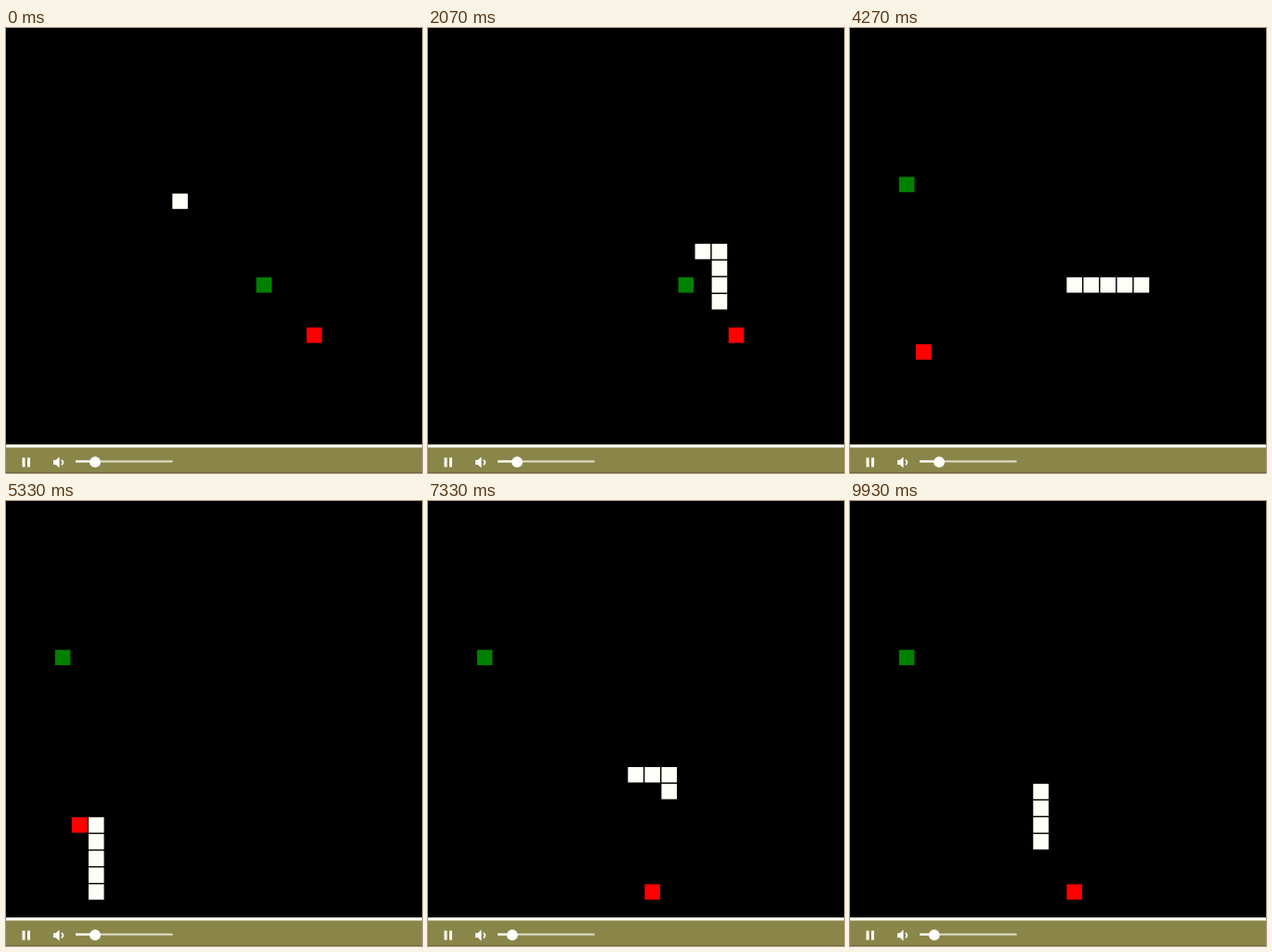
Recreate the animation shown at these times as an HTML page with a canvas. Size 448 by 480 pixels, loop 9.99 s.

```html
<!DOCTYPE html>
<html lang="en">
<head>
<meta charset="utf-8">
<title>Snake volume control</title>
<style>
  html, body { margin: 0; width: 100%; height: 100%; overflow: hidden; background: #000; }
  canvas { display: block; }
</style>
</head>
<body>
<canvas id="stage" width="448" height="480"></canvas>
<script>
const ctx = document.getElementById('stage').getContext('2d');
const LOOP = 9990;
const GRID = 25;
const PITCH = 18.06;
const CELL = 16.6;

const DIRS = { U: [0, -1], D: [0, 1], L: [-1, 0], R: [1, 0] };
const ROUTE = 'D9 L2 U6 R9 D8 L6 U3 R9 U3 L15 D9 R4 U5 L6 U3 R11 D10 L7 D4 R4 D15';

// Walk the route once; the board wraps at its edges.
const path = [[10, 10]];
for (const leg of ROUTE.split(' ')) {
  const [dx, dy] = DIRS[leg[0]];
  for (let n = +leg.slice(1); n > 0; n--) {
    const [x, y] = path[path.length - 1];
    path.push([(x + dx + GRID) % GRID, (y + dy + GRID) % GRID]);
  }
}

// Red shortens the snake and lowers the volume, green does the opposite.
const stages = [
  { from: 0, red: [18, 18], green: [15, 15], size: 5 },
  { from: 50, red: [4, 19], green: [15, 15], size: 4 },
  { from: 60, red: [4, 19], green: [3, 9], size: 5 },
  { from: 93, red: [13, 23], green: [3, 9], size: 4 }
];
const stageAt = step => stages.filter(s => s.from <= step).pop();

// Ticks come at 0, 70 and 130 ms of every 200 ms.
function tickAt(t) {
  const rest = t % 200;
  return 3 * Math.floor(t / 200) + (rest >= 70) + (rest >= 130);
}

// The game waits two ticks, and later makes two moves within one tick.
const stepAt = tick => Math.max(0, tick - 2) + (tick >= 82 ? 1 : 0);

function rect(x, y, w, h, color) {
  ctx.fillStyle = color;
  ctx.fillRect(x, y, w, h);
}

function cell([col, row], color) {
  rect(col * PITCH - 1.4, row * PITCH - 2, CELL, CELL, color);
}

function drawBar(size) {
  rect(0, 449, 448, 31, '#8a8649');
  rect(0, 449.5, 448, 3, '#fff');
  rect(0, 479, 448, 1, '#6b6838');

  rect(17.5, 463.5, 3, 10, '#fff');
  rect(23, 463.5, 3, 10, '#fff');

  ctx.fillStyle = ctx.strokeStyle = '#fff';
  ctx.fill(new Path2D('M51 466h2.8l3.7-3.5v12l-3.7-3.5H51z'));
  ctx.lineWidth = 1.6;
  ctx.beginPath();
  ctx.arc(58, 468.5, 3.2, -1, 1);
  ctx.stroke();

  const knob = 75 + 105 * (size - 1) / 20;
  rect(75, 466.5, 104.5, 2, '#e4e1cc');
  rect(75, 466.5, knob - 75, 2, '#fff');
  ctx.fillStyle = '#fff';
  ctx.beginPath();
  ctx.arc(knob, 468.2, 5.9, 0, 2 * Math.PI);
  ctx.fill();
}

function draw(t) {
  const step = stepAt(tickAt(t));
  const now = stageAt(step);
  const { size } = stageAt(Math.max(0, step - 1));

  rect(0, 0, 448, 480, '#000');
  cell(now.green, '#008000');
  cell(now.red, '#f00');
  path.slice(Math.max(0, step - size + 1), step + 1).forEach(p => cell(p, '#fffff8'));
  drawBar(now.size);
}

const start = performance.now();
function loop() {
  draw((performance.now() - start) % LOOP);
  requestAnimationFrame(loop);
}
loop();
</script>
</body>
</html>
```
